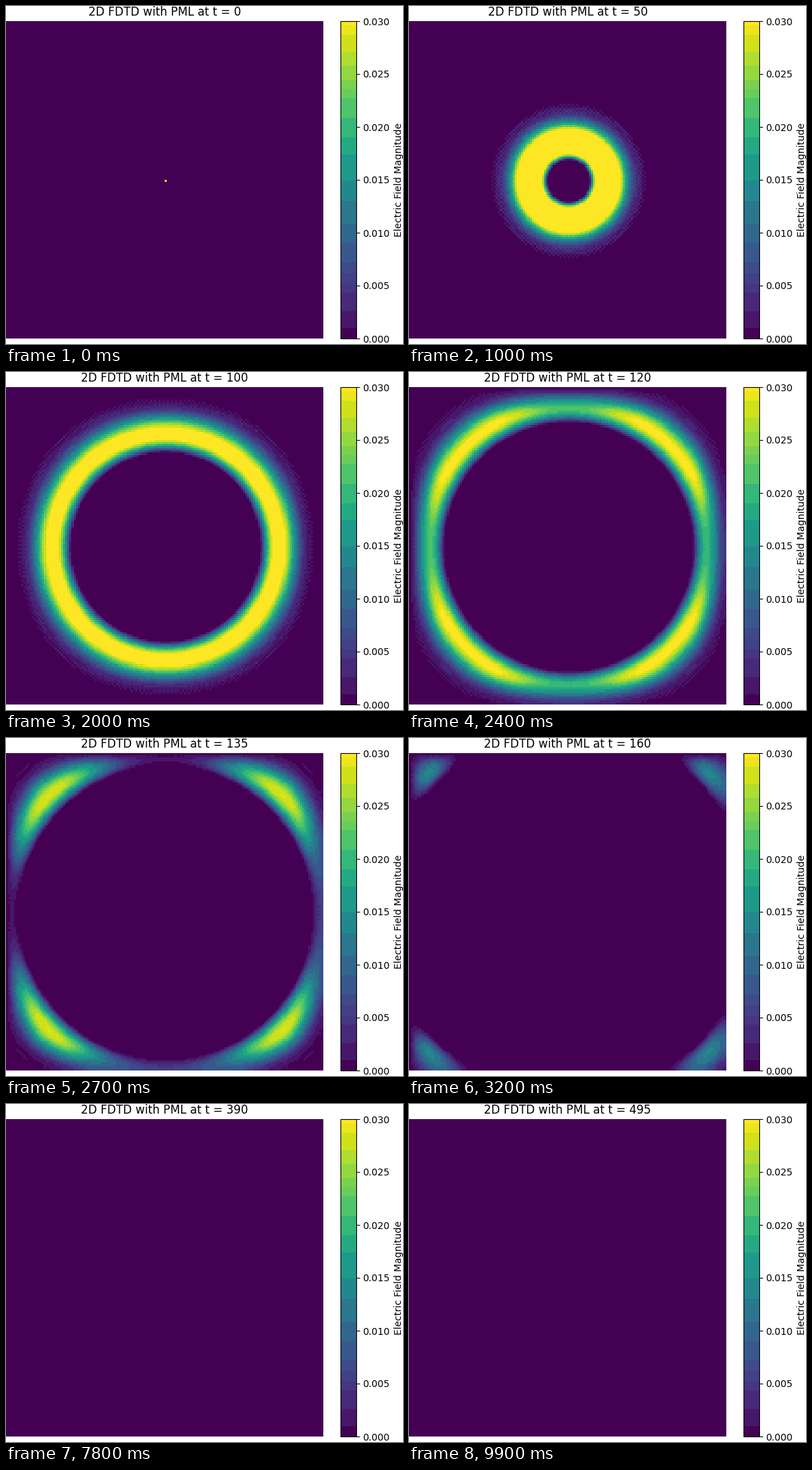
Write a matplotlib script that moves like this. It is 578 px wide and 492 px high and loops after 10000 ms.

```python
import numpy as np
import matplotlib.pyplot as plt
from matplotlib.animation import FuncAnimation
from matplotlib.colors import ListedColormap

W, H, DPI = 578, 492, 100
N = 150                  # grid cells per side
PML = 20                 # absorbing cells on each side
COURANT = 1 / np.sqrt(2)
FRAMES, STRIDE = 100, 5
VMAX = 0.03


def damping(pos):
    """Decay and update factors of the absorbing layer along one axis."""
    depth = np.maximum(np.maximum(PML - pos, pos - (N - 1 - PML)), 0) / PML
    s = 0.19 * depth ** 2
    return (1 - s / 2) / (1 + s / 2), COURANT / (1 + s / 2)


def simulate():
    """Split-field 2D FDTD driven by a Gaussian pulse in the centre."""
    cells = np.arange(N)
    ae, be = damping(cells[1:])
    ah, bh = damping(cells[:-1] + 0.5)
    ez, ezx, ezy, hx, hy = np.zeros((5, N, N))
    mid = N // 2
    shots = []
    for t in range((FRAMES - 1) * STRIDE + 1):
        hx[:, :-1] = ah * hx[:, :-1] - bh * np.diff(ez, axis=1)
        hy[:-1] = ah[:, None] * hy[:-1] + bh[:, None] * np.diff(ez, axis=0)
        ezx[1:, 1:] = (ae[:, None] * ezx[1:, 1:]
                       + be[:, None] * np.diff(hy, axis=0)[:, 1:])
        ezy[1:, 1:] = ae * ezy[1:, 1:] - be * np.diff(hx, axis=1)[1:]
        pulse = 3.2 * np.exp(-0.5 * ((t - 30) / 10) ** 2)
        ezx[mid, mid] += pulse / 2
        ezy[mid, mid] += pulse / 2
        ez = ezx + ezy
        if t % STRIDE == 0:
            shots.append(ez.copy())
    return shots


def banded_viridis(size=462):
    """Viridis reduced to a few flat steps."""
    edges = np.array([0, 15, 40, 67, 80, 95, 111, 139, 167, 200, 230, 268,
                      293, 321, 350, 363, 376, 397, 417, 442, 456, size])
    mids = (edges[:-1] + edges[1:]) / 2 / size
    mids[0], mids[-1] = 0, 1
    band = np.searchsorted(edges, np.arange(size), side="right") - 1
    return ListedColormap(plt.get_cmap("viridis")(mids[band]))


def px_axes(x, y, w, h):
    return fig.add_axes([x / W, 1 - (y + h) / H, w / W, h / H])


fields = simulate()

plt.rcParams["font.family"] = "DejaVu Sans"
fig = plt.figure(figsize=(W / DPI, H / DPI), dpi=DPI, facecolor="white")
ax = px_axes(0, 22, 462, 462)
ax.set_axis_off()
image = ax.imshow(fields[0], cmap=banded_viridis(), vmin=0, vmax=VMAX,
                  interpolation="nearest", aspect="auto")
title = ax.set_title("", fontsize=12)

cax = px_axes(486.8, 22, 23.1, 462)
bar = fig.colorbar(image, cax=cax)
bar.set_label("Electric Field Magnitude")


def draw(i):
    image.set_data(fields[i])
    title.set_text(f"2D FDTD with PML at t = {i * STRIDE}")
    return image, title


anim = FuncAnimation(fig, draw, frames=FRAMES, interval=100,
                     repeat=True, repeat_delay=0, blit=False)
plt.show()
```
